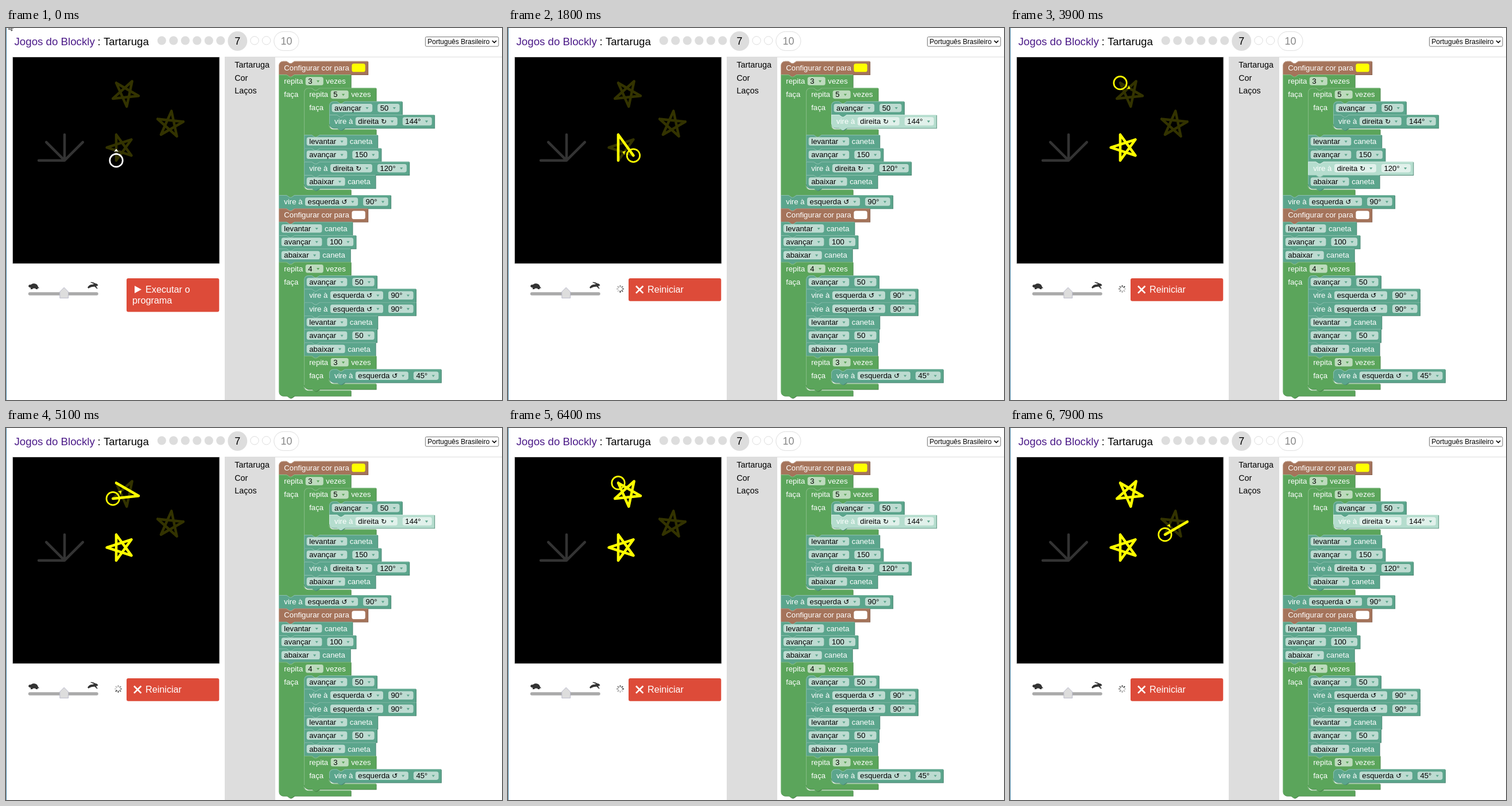
Recreate the animation shown at these times as an HTML page with a canvas. Size 864 by 648 pixels, loop 8 s.

```html
<!DOCTYPE html>
<html lang="pt-BR">
<head>
<meta charset="utf-8">
<title>Tartaruga</title>
<style>
html, body { margin: 0; width: 100%; height: 100%; overflow: hidden; background: #fff; }
canvas { display: block; }
</style>
</head>
<body>
<canvas id="stage" width="864" height="648"></canvas>
<script>
const g = document.getElementById('stage').getContext('2d');
const SANS = '"Liberation Sans", Arial, sans-serif';
const TAU = Math.PI * 2;
const LOOP = 8000;

// Drawing helpers
function fill(color, path) { g.fillStyle = color; g.fill(path); }
function stroke(color, width, path) {
  g.strokeStyle = color;
  g.lineWidth = width;
  g.stroke(path);
}
function rect(x, y, w, h, color) { g.fillStyle = color; g.fillRect(x, y, w, h); }
function rounded(x, y, w, h, r) { const p = new Path2D(); p.roundRect(x, y, w, h, r); return p; }
function circle(x, y, r) { const p = new Path2D(); p.arc(x, y, r, 0, TAU); return p; }
function text(s, x, y, size, color, family = SANS) {
  g.font = `${size}px ${family}`;
  g.fillStyle = color;
  g.fillText(s, x, y);
}

// Blocks
const ROW = 23.32, BAR = 11.7, INDENT = 43.9, ROUND = 7.2, FONT = 13.2;
const EDGE = 9, PAD = 4.5, ARROW = 14.7, SYMBOL = 9.7, SWATCH = 23.4;
const hue = (base, dark, light, lit) => ({ base, dark, light, lit });
const BROWN = hue('#a5745b', '#845d49', '#c09e8c', '#ddc0b5');
const GREEN = hue('#5ba55b', '#498449', '#8cc08c', '#b5ddb5');
const TEAL = hue('#5ba58c', '#498470', '#8cc0ae', '#b5ddce');

const colour = c => ({ hue: BROWN, fields: ['Configurar cor para', { swatch: c }] });
const repeat = (n, kids) => ({ hue: GREEN, fields: ['repita', [n], 'vezes'], kids });
const go = n => ({ hue: TEAL, fields: [['avançar'], [n]] });
const turn = (side, deg) => ({ hue: TEAL, fields: ['vire à', [side], [deg]] });
const pen = act => ({ hue: TEAL, fields: [[act], 'caneta'] });
const right = deg => turn('direita ↻', deg);
const left = deg => turn('esquerda ↺', deg);

const program = [
  colour('#ff0'),
  repeat('3', [
    repeat('5', [go('50'), right('144°')]),
    pen('levantar'), go('150'), right('120°'), pen('abaixar')
  ]),
  left('90°'), colour('#fff'), pen('levantar'), go('100'), pen('abaixar'),
  repeat('4', [
    go('50'), left('90°'), left('90°'), pen('levantar'), go('50'), pen('abaixar'),
    repeat('3', [left('45°')])
  ])
];

function splitSymbol(s) {
  const m = s.match(/^(.*)([↻↺])$/);
  return m ? [m[1], m[2]] : [s, ''];
}
function fieldWidth(f) {
  if (f.swatch) return SWATCH;
  g.font = `${FONT}px ${SANS}`;
  if (!Array.isArray(f)) return g.measureText(f).width;
  const [word, symbol] = splitSymbol(f[0]);
  return g.measureText(word).width + (symbol ? SYMBOL : 0) + ARROW + 2 * PAD;
}
const isLabel = f => typeof f === 'string';

const blocks = [];
function place(list, x, y) {
  list.forEach((b, i) => {
    Object.assign(b, { x, y, first: i === 0, last: i === list.length - 1 });
    blocks.push(b);
    let cx = x;
    b.spots = b.fields.map((f, j) => {
      const prev = b.fields[j - 1];
      if (j === 0) cx += isLabel(f) ? EDGE : PAD;
      else cx += isLabel(f) || isLabel(prev) ? PAD : EDGE;
      const spot = { f, x: cx, w: fieldWidth(f) };
      cx += spot.w;
      return spot;
    });
    b.w = cx + (isLabel(b.fields[b.fields.length - 1]) ? EDGE : PAD) - x;
    b.h = ROW;
    if (b.kids) {
      b.arm = place(b.kids, x + INDENT, y + ROW) + 2;
      b.h = b.arm - 2 + BAR - y;
    }
    y += b.h;
  });
  return y;
}
place(program, 475.3, 57.8);

function notch(p, x, y, back) {
  const steps = [[13.5, 0], [18.9, 3.6], [21.6, 3.6], [27, 0]];
  if (back) steps.reverse();
  for (const [dx, dy] of steps) p.lineTo(x + dx, y + dy);
}
function topEdge(p, { x, y, w, first }) {
  if (first) {
    p.lineTo(x, y + ROUND);
    p.arcTo(x, y, x + ROUND, y, ROUND);
  } else p.lineTo(x, y);
  notch(p, x, y);
  p.lineTo(x + w, y);
}
function innerFoot(p, { x, w, arm }) {
  const ix = x + INDENT;
  p.lineTo(ix, arm - ROUND);
  p.arcTo(ix, arm, ix + ROUND, arm, ROUND);
  p.lineTo(x + w, arm);
}
function outline(b) {
  const { x, y, w, h, kids, last } = b, p = new Path2D();
  topEdge(p, b);
  if (kids) {
    const ix = x + INDENT, iy = y + ROW;
    p.lineTo(x + w, iy);
    notch(p, ix, iy, true);
    p.lineTo(ix + ROUND, iy);
    p.arcTo(ix, iy, ix, iy + ROUND, ROUND);
    innerFoot(p, b);
  }
  p.lineTo(x + w, y + h);
  notch(p, x, y + h, true);
  if (last) {
    p.lineTo(x + ROUND, y + h);
    p.arcTo(x, y + h, x, y + h - ROUND, ROUND);
  } else p.lineTo(x, y + h);
  p.closePath();
  return p;
}
function shine(b) {
  const p = new Path2D();
  p.moveTo(b.x, b.y + b.h - (b.last ? ROUND : 0));
  topEdge(p, b);
  if (b.kids) {
    p.moveTo(b.x + INDENT, b.arm - ROUND);
    innerFoot(p, b);
  }
  return p;
}
for (const b of blocks) { b.shape = outline(b); b.shine = shine(b); }

function drawField({ f, x, w }, cy, color) {
  const base = cy + 4.6;
  if (isLabel(f)) return text(f, x, base, FONT, '#fff');
  const box = rounded(x, cy - 7.2, w, 14.5, 3.6);
  if (f.swatch) return fill(f.swatch, box);
  fill('rgba(255,255,255,.6)', box);
  const [word, symbol] = splitSymbol(f[0]);
  text(word, x + PAD, base, FONT, '#000');
  if (symbol) text(symbol, x + w - PAD - ARROW - SYMBOL, base, 12, '#000', '"DejaVu Sans", sans-serif');
  const ax = x + w - 9.2, ay = cy - 1.2, p = new Path2D();
  p.moveTo(ax - 2.6, ay);
  p.lineTo(ax + 2.6, ay);
  p.lineTo(ax, ay + 3.6);
  fill(color, p);
}
function drawBlock(b, lit) {
  const { hue: c, shape } = b;
  g.save();
  g.translate(0.9, 0.9);
  fill(c.dark, shape);
  g.restore();
  fill(lit ? c.lit : c.base, shape);
  g.save();
  g.clip(shape);
  stroke(lit ? '#d3ebe2' : c.light, 1.8, b.shine);
  g.restore();
  const cy = b.y + 11.4;
  for (const s of b.spots) drawField(s, cy, c.base);
  if (b.kids) text('faça', b.x + EDGE, cy + ROW + 4.2, FONT, '#fff');
}

// Turtle world: 0.9 px per unit, headings in degrees clockwise from up
const HOME = { x: 192, y: 230.7, a: 0 };
const rad = a => a * Math.PI / 180;
const ahead = ({ x, y, a }, d) => ({ x: x + 0.9 * d * Math.sin(rad(a)), y: y - 0.9 * d * Math.cos(rad(a)), a });

// Command 0 sets the colour; each star then takes 14 commands
const CYCLE = 14;
const LIT = [...Array(5).fill([3, 4]).flat(), 5, 6, 7, 8];
function run(count) {
  let at = HOME;
  const lines = [];
  for (let n = 1; n <= count; n++) {
    const m = (n - 1) % CYCLE;
    if (m < 10 && m % 2 === 0) {
      const to = ahead(at, 50);
      lines.push([at, to]);
      at = to;
    } else if (m < 10) at = { ...at, a: at.a + 144 };
    else if (m === 11) at = ahead(at, 150);
    else if (m === 12) at = { ...at, a: at.a + 120 };
  }
  return { at, lines };
}
function drawLines(lines, color) {
  const p = new Path2D();
  for (const [from, to] of lines) { p.moveTo(from.x, from.y); p.lineTo(to.x, to.y); }
  g.lineCap = g.lineJoin = 'round';
  stroke(color, 4.5, p);
  g.lineCap = 'butt';
  g.lineJoin = 'miter';
}
function drawTurtle(at, color) {
  stroke(color, 2.7, circle(at.x, at.y, 11.25));
  const point = (r, turn) => {
    const q = ahead({ ...at, a: at.a + turn * 180 / Math.PI }, 12.5 + r);
    return [q.x, q.y];
  };
  const p = new Path2D();
  p.moveTo(...point(10, 0));
  p.lineTo(...point(4, -0.3));
  p.bezierCurveTo(...point(6, -0.15), ...point(6, 0.15), ...point(4, 0.3));
  fill(color, p);
}
const goalStars = run(42).lines;
const stem = { x: HOME.x - 90, y: HOME.y };
const goalRays = [-90, -45, 0, 45].map(a => [stem, ahead({ ...stem, a }, 50)]);

function drawWorld(step) {
  stroke('#ccc', 1, rounded(11.5, 50.5, 360.5, 360, 0));
  rect(12, 51, 359.5, 359, '#000');
  drawLines(goalStars, '#330');
  drawLines(goalRays, '#333');
  const { at, lines } = run(step);
  drawLines(lines, '#ff0');
  drawTurtle(at, step < 0 ? '#fff' : '#ff0');
}

// Page furniture
function drawHeader() {
  text('Jogos do Blockly', 14.5, 29.5, 18.7, '#4b1a88');
  text(': Tartaruga', 159.5, 29.5, 18.7, '#000');
  for (let i = 0; i < 6; i++) fill('#ddd', circle(271.3 + i * 20.5, 21.8, 7.6));
  fill('#ddd', circle(403.3, 22.8, 17));
  text('7', 398.2, 29.2, 18, '#000');
  for (const x of [433, 453.6]) stroke('#ddd', 1, circle(x, 21.8, 7.2));
  stroke('#ddd', 1, rounded(466.8, 6.3, 43.2, 33, 16.5));
  text('10', 478.4, 29.2, 18, '#888');

  stroke('#767676', 1, rounded(730.5, 15.5, 127.5, 16.5, 2));
  text('Português Brasileiro', 734.3, 28, 12, '#000');
  const p = new Path2D('M847 22l3.6 3.6 3.6-3.6');
  stroke('#000', 1.7, p);
}
function drawToolbox() {
  rect(381, 50, 483, 1, '#ddd');
  rect(381, 50, 88, 598, '#ddd');
  ['Tartaruga', 'Cor', 'Laços'].forEach((s, i) => text(s, 398.2, 69 + i * 22.5, 14.4, '#000'));
}
function drawSlider() {
  g.lineCap = 'round';
  stroke('#aaa', 5.4, new Path2D('M41.5 463H158'));
  g.lineCap = 'butt';
  const knob = new Path2D('M101.2 452l-7.4 7.4v11h14.8v-11z');
  fill('#ddd', knob);
  stroke('#bbc', 1, knob);
  fill('#333', new Path2D(
    'M39 449.5q1-3 4-2.3q4-3.2 8-1.8q4 1.4 5 5.6l2 2.2h-3l.4 1.8h-3.4l-1-1.6h-4l-1 1.6h-3.4l.8-2.6q-3.6-.2-4.4-2.9z'));
  fill('#333', new Path2D(
    'M142 452q3-5.4 9-5.2l2.4-1l-6-2.2l.4-1.2q5 0 8 2.6q3.6.2 4.6 3.4l-3.4 1.4l2.6 4.2l-1 .6l-4.2-4l-5 .4l-3.8 1.6l-1.8 1.2z'));
}
function drawButton(running) {
  fill('#dd4b39', rounded(210, 436, 161.3, running ? 39.7 : 58.5, 3));
  if (running) {
    stroke('#fff', 2.7, new Path2D('M223 449.5l12.4 12.4M235.4 449.5l-12.4 12.4'));
    text('Reiniciar', 243, 461, 16.2, '#fff');
  } else {
    fill('#fff', new Path2D('M224 449l12 6.5l-12 6.5z'));
    text('Executar o', 243, 461, 16.2, '#fff');
    text('programa', 220, 480, 16.2, '#fff');
  }
}
function drawSpinner(tick) {
  for (let i = 0; i < 8; i++) {
    const a = i * TAU / 8, age = ((tick - i) % 8 + 8) % 8;
    const shade = 70 + age * 19, c = Math.cos(a), s = Math.sin(a), p = new Path2D();
    p.moveTo(195.5 + 3.2 * c, 454.5 + 3.2 * s);
    p.lineTo(195.5 + 6.5 * c, 454.5 + 6.5 * s);
    stroke(`rgb(${shade},${shade},${shade})`, 2, p);
  }
}
function drawPointer() {
  const p = new Path2D('M5 -6v9l2.4-2l2 4l1.6-.9l-2-4h4z');
  fill('#fff', p);
  stroke('#222', 1, p);
}

// The picture refreshes every 100 ms, with a few skipped beats
const SKIPPED = new Set([14, 25, 27, 36, 40, 50, 62, 75]);
function stepAt(t) {
  if (t < 600) return -1;
  const n = t < 4910 ? (t - 600) / 241 : 18 + (t - 4910) / 226;
  return Math.min(30, Math.floor(n));
}
function draw(ms) {
  let tick = Math.floor((ms % LOOP) / 100);
  if (SKIPPED.has(tick)) tick--;
  const running = tick >= 5, step = stepAt(tick * 100);
  const lit = step < 0 ? -1 : step === 0 ? 0 : LIT[(step - 1) % CYCLE];

  rect(0, 0, 864, 648, '#fff');
  rect(0, 0, 1, 648, '#4a86a8');
  drawHeader();
  drawWorld(step);
  drawToolbox();
  blocks.forEach((b, i) => drawBlock(b, i === lit));
  drawSlider();
  drawButton(running);
  if (running) drawSpinner(tick);
  else drawPointer();
}

const start = performance.now();
function loop() {
  draw(performance.now() - start);
  requestAnimationFrame(loop);
}
loop();
</script>
</body>
</html>
```
